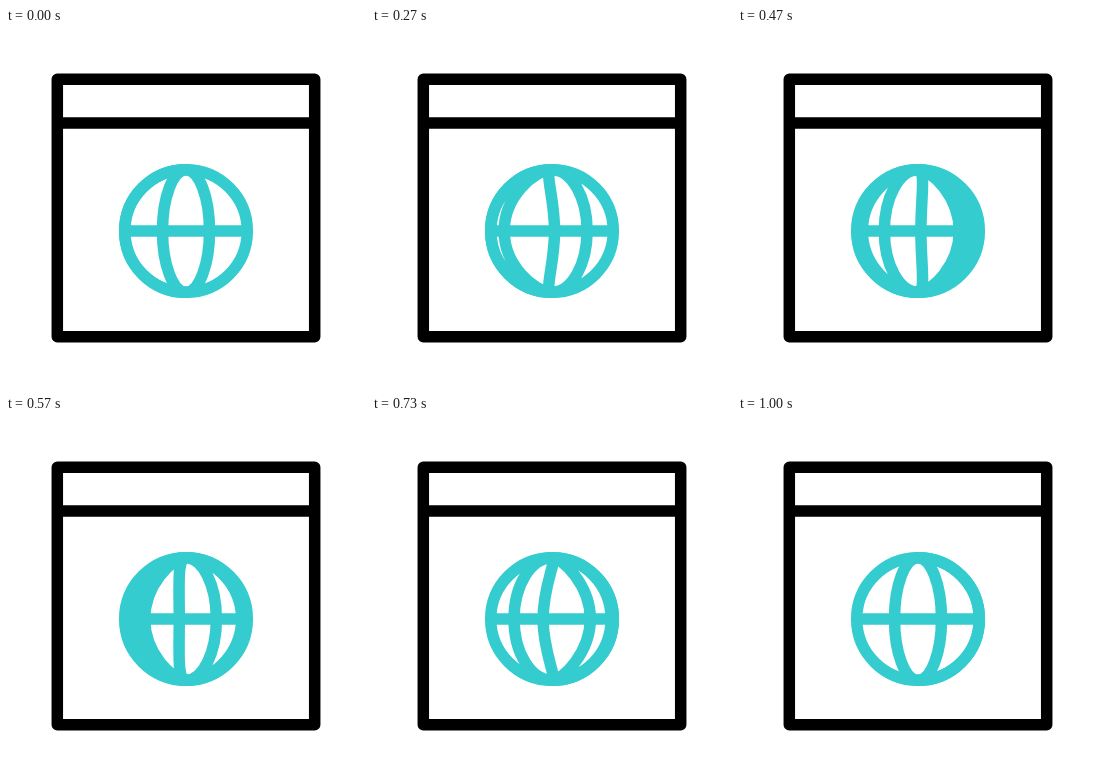
Animation of 360 by 360 pixels, one loop 1630 ms. Source, as an HTML page:

```html
<!DOCTYPE html>
<html lang="en">
<head>
<meta charset="utf-8">
<title>Browser globe</title>
<style>
  html, body { margin: 0; width: 100%; height: 100%; overflow: hidden; background: #fff; }
  svg { display: block; width: 100vw; height: 100vh; }
</style>
</head>
<body>
<svg viewBox="0 0 360 360" fill="none">
  <g stroke="#000" stroke-width="11.5" stroke-linejoin="round">
    <rect x="51.3" y="51.3" width="257.4" height="257.4"/>
    <path d="M51.3 95H308.7"/>
  </g>
  <g stroke="#34cccf" stroke-width="11.5">
    <circle cx="180" cy="203" r="61.3"/>
    <path d="M119 203H241"/>
    <path id="meridians"/>
  </g>
</svg>
<script>
const LOOP = 1630, TICK = 100 / 3;
const CX = 180, CY = 203, R = 61.3;
const REST = 23.5;   // half width of the resting oval
const ARC = 0.5523;  // handle length of a quarter ellipse
const TURN = 19;     // ticks from rest to rim
const SPIN = 10;     // ticks per quarter turn of the middle oval

const meridians = document.getElementById('meridians');
const clamp = (v, lo, hi) => Math.min(hi, Math.max(lo, v));

function ease(u) {
  u = clamp(u, 0, 1);
  return u * u * (3 - 2 * u);
}

// p runs from -1 (left rim) through 0 (rest) to 1 (right rim); side is -1 or 1.
const morphX = (p, side) => side * REST + p * (side * p < 0 ? R + REST : R - REST);
const spinX = (p, side) => R * Math.sin(clamp(p * 90 + side * 18, -90, 90) * Math.PI / 180);

// The edge that crosses the globe keeps a wide shoulder at the poles.
function edge(x, p, side) {
  const q = Math.min(1, Math.abs(p));
  const shoulder = side * p < 0 ? side * (R + REST) * q * (1 - q) : 0;
  const pole = CX + ARC * (x + shoulder), mid = CX + x;
  return `M${CX} ${CY - R}C${pole} ${CY - R} ${mid} ${CY - ARC * R} ${mid} ${CY}` +
    `S${pole} ${CY + R} ${CX} ${CY + R}`;
}

const oval = (p, place) => [-1, 1].map(side => edge(place(p, side), p, side)).join('');

function draw(ms) {
  const tick = Math.floor((ms % LOOP + 3.4) / TICK);
  meridians.setAttribute('d',
    oval(ease((tick - 1) / TURN), morphX) +
    oval(clamp((tick - 15.7) / SPIN, -1.2, 1.2), spinX) +
    oval(ease((tick - 11) / TURN) - 1, morphX));
}

const start = performance.now();
function loop() {
  draw(performance.now() - start);
  requestAnimationFrame(loop);
}
loop();
</script>
</body>
</html>
```
